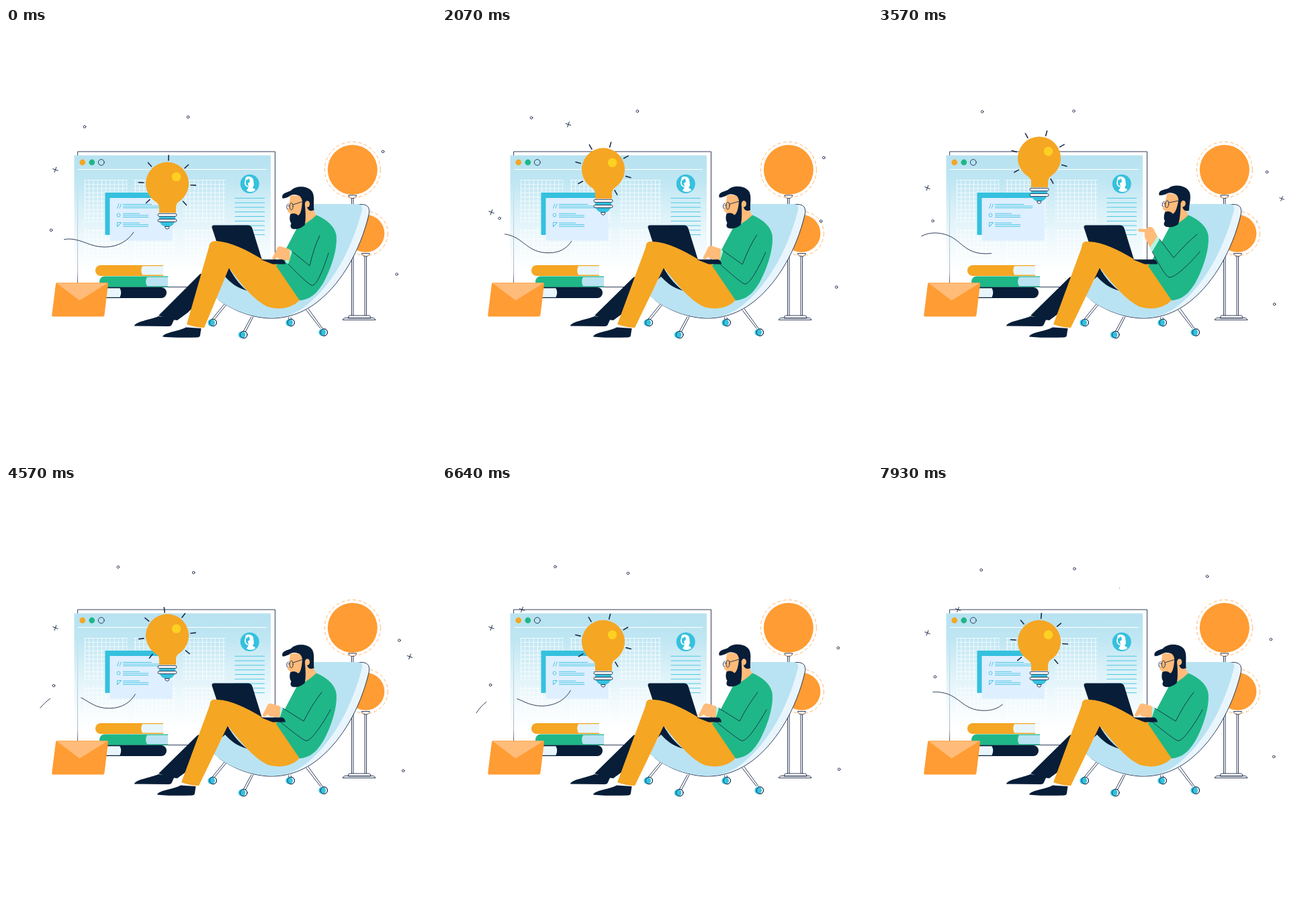
These frames come from a looping animation (640x640 px, 8 s). An HTML page:

```html
<!DOCTYPE html>
<html lang="en">
<head>
<meta charset="utf-8">
<title>Working idea</title>
<style>
  html, body { margin: 0; width: 100%; height: 100%; overflow: hidden; background: #fff; }
  svg { display: block; width: 100vw; height: 100vh; }
  .line { fill: none; stroke: #1b2a4a; stroke-width: .9; stroke-linecap: round; stroke-linejoin: round; }
  .outlined { fill: #fff; stroke: #1b2a4a; stroke-width: .9; }
  .navy { fill: #071d38; }
  .yellow { fill: #f5a623; }
  .orange { fill: #ff9c33; }
  .green { fill: #1fb787; }
  .cyan { fill: #35c1de; }
  .pale { fill: #b9e3f2; }
  .paper { fill: #e9f5fd; }
  .skin { fill: #ffbb79; }
  .code { fill: none; stroke: #4cc8e2; stroke-width: 1; }
  .dash { fill: none; stroke: #ffb469; stroke-width: 1; stroke-dasharray: 5 3.5; }
</style>
</head>
<body>
<svg viewBox="0 0 640 640">
  <defs>
    <linearGradient id="fade" x1="0" y1="0" x2="0" y2="1">
      <stop offset="0" stop-color="#b7e2f1"/>
      <stop offset=".2" stop-color="#bfe6f3"/>
      <stop offset=".9" stop-color="#fff" stop-opacity=".6"/>
      <stop offset="1" stop-color="#fff" stop-opacity="0"/>
    </linearGradient>
    <pattern id="cells" width="6.25" height="6.25" patternUnits="userSpaceOnUse" x="117" y="226">
      <path d="M0 .5H6.25M.5 0V6.25" stroke="#fff" stroke-opacity=".8" fill="none"/>
    </pattern>
    <g id="wheel">
      <circle class="outlined" cx="1.8" r="5.2"/>
      <circle class="cyan" cx="-.8" r="5.3"/>
      <circle class="line" cx="1.8" r="5.2"/>
    </g>
    <path id="dome" class="outlined" d="M-6 0H6Q5 4.5 0 4.5Q-5 4.5 -6 0Z"/>
  </defs>

  <!-- browser window -->
  <rect class="line" x="107" y="184" width="293.5" height="201.5"/>
  <rect x="101.5" y="189.5" width="292.5" height="193" fill="url(#fade)"/>
  <path d="M107 210.5H388" stroke="#fff"/>
  <circle class="yellow" cx="113.8" cy="200" r="4.4"/>
  <circle class="green" cx="127.8" cy="200" r="4.4"/>
  <circle class="line" cx="141.8" cy="200" r="4.4"/>
  <g id="grids" fill="url(#cells)"></g>
  <circle class="cyan" cx="362.8" cy="232" r="14"/>
  <path fill="#fff" d="M357 222Q364 219 368 225L369 234 367 238Q371 239 371 242Q363 246 358 242L361 237Q355 236 355 230Z"/>
  <path class="cyan" d="M357 227L362 224 363 229 360 231 361 236 357 233Z"/>
  <g id="sidebar"></g>
  <path class="cyan" d="M147.5 245H240V308H147.5Z"/>
  <path fill="#deefff" d="M154.5 253H248V316.5H154.5Z"/>
  <path class="code" d="M165.5 268.5l2.5-7m1 7l2.5-7M165.5 296v-6.5h6zl6-6.5"/>
  <circle class="code" cx="167.5" cy="278.5" r="2.4"/>
  <g id="snippets"></g>

  <path class="line" id="wave" pathLength="100" stroke-dasharray="70 30"/>

  <!-- bulb -->
  <g id="bulb">
    <g id="rays" stroke="#1b2a4a" stroke-width="1.6" stroke-linecap="round"></g>
    <path class="yellow" d="M228 275V266Q227 261 222 258A32 32 0 1 1 258 258Q253 261 253 266V275Z"/>
    <circle cx="253.5" cy="221.500" r="6.8" fill="#fdd022"/>
    <path class="cyan" d="M228 280h24v5h-24zM229 289H251Q248 296 240 296Q232 296 229 289Z"/>
    <rect class="outlined" x="226" y="276.300" width="28" height="4" rx="2"/>
    <rect class="outlined" x="226" y="284.500" width="28" height="4" rx="2"/>
    <path class="outlined" d="M236.500 295.500Q237 299.300 240 299.300Q243 299.300 243 295.500Z"/>
  </g>

  <!-- books and envelope -->
  <path class="yellow" d="M141 353H234V369H141A8 8 0 0 1 141 353Z"/>
  <path class="paper" d="M203 354.300H234V367.600H203Q199.500 361 203 354.300Z"/>
  <path class="green" d="M147 369.500H241V385.500H147A8 8 0 0 1 147 369.500Z"/>
  <path class="pale" d="M210 370.800H241V384.200H210Q206 377.500 210 370.800Z"/>
  <path class="navy" d="M149 386H231A8 8 0 0 1 231 402H149Z"/>
  <path class="paper" d="M149 387.300H169.500Q173 394 169.500 400.700H149Z"/>
  <path class="orange" d="M76 379H150Q152.500 379 152 381.500L146.500 427Q146 429.500 144 429.500H70Q68 429.500 68.300 427L74 381.500Q74.300 379 76 379Z"/>
  <path class="skin" d="M75 379.500H151.500L109.500 405.500Z"/>

  <!-- lamps -->
  <path class="line" d="M514.500 254V428M517 254V428M534 340V428M536.500 340V428"/>
  <use href="#dome" x="515.800" y="249"/>
  <use href="#dome" x="535.300" y="335.500"/>
  <path class="outlined" d="M509 432Q509 428 512 428H540Q543 428 543 432ZM501 434.500Q502 431.500 505 431.500H546Q549 431.500 550 434.500Z"/>
  <circle class="orange" cx="515.800" cy="211" r="37"/>
  <circle class="dash" cx="515.800" cy="211" r="41.500"/>
  <circle class="orange" cx="535.300" cy="305.800" r="28"/>
  <circle class="dash" cx="535.300" cy="305.800" r="33"/>

  <!-- chair -->
  <path class="line" d="M325 411L307 433M328 412L310 434M365 430L353 452M368 430L356 453M420.500 431L421 434M424 431L425 434M447 420L468 447M450 418L471 447"/>
  <use href="#wheel" x="306.500" y="438.500"/>
  <use href="#wheel" x="352" y="456.500"/>
  <use href="#wheel" x="422.500" y="438.500"/>
  <use href="#wheel" x="471.500" y="453"/>
  <path class="paper" stroke="#1b2a4a" stroke-width=".9" d="M458 262.500H529C539 262.500 542 268 540 278C527 332 500 377 468 404C442 426 415 433 390 432C360 430 332 417 316 404L360 380 420 370Z"/>
  <path class="pale" d="M456 262H524Q531 262 530 271C516 324 490 378 447 413Q424 431 397 431.500C360 431 328 416 308 398L330 362 420 380Z"/>

  <!-- legs and laptop -->
  <path class="navy" d="M191 443.500C192 437 216 434 227 429L251 432 247 441Q246 444 242 444Z"/>
  <path class="navy" id="backLeg"/>
  <path class="navy" d="M306.500 297Q306 293.500 309.500 293.500H360Q365 293.500 366.500 298L382 348 340 340 315 323Z"/>
  <path class="yellow" id="frontLeg"/>
  <path class="navy" id="shoe" d="M233 459.500C235 453 256 452 268 445.500L290.500 447 289 457Q289 460 285 460.500C265 461 245 461 233 459.500Z"/>

  <!-- upper body -->
  <path class="skin" d="M446 266L458 270Q459 277 464 281Q458 292 440 295Z"/>
  <path class="green" d="M434 296Q448 292 462 278.500C475 284 489 294 491.500 308C494 328 484 358 473 378C462 397 452 404 437 405.500L402 354Q409 345 416 330Z"/>
  <path class="green" id="arm"/>
  <path id="cuff" fill="#b3f4e3"/>
  <path class="line" id="creases"/>
  <g id="hand" class="skin">
    <path id="typing" d="M4 -9L-9 -13Q-14 -14 -15.500 -9L-22 4Q-22 7 -19 6.500L-14 3 -12 6 4 8Z"/>
    <path id="pointing" d="M6 -9L2 -16Q0 -23 -6 -23L-12 -19.500 -22 -20Q-24 -17 -21 -15.500L-13 -15Q-14 -8 -11 -3L-5 8Z"/>
  </g>
  <path class="navy" d="M379 344.500H411Q415 345 416 351.500H397Z"/>
  <g id="head">
    <path class="skin" d="M423 249C422 259 421 268 419 272Q419 274 422 275L425 281 441 283 450 270 447 250Z"/>
    <path class="navy" d="M411.500 253.500C409 246 418 245 424 242C431 234 450 234 456 244C460 252 457 262 458.500 271Q452 274 449 269L446 262 441.500 262Q441 252 436 249.500Q426 246 421 251Q414 254 411.500 253.500Z"/>
    <path class="navy" d="M441 258L444.500 257C445.500 270 447 285 444.500 293.500C438 299 431 300.500 425.500 298.500Q422 296 424.500 291Q421 286 423 277.500Q430 274 435 279Q440 276 441 258Z"/>
    <ellipse class="skin" cx="448.500" cy="262" rx="3.600" ry="4.800"/>
    <path class="line" d="M427 263L441 258.500M420.500 262Q417.500 262 417.800 267Q418 270 419.500 270M420 265L422 264.500"/>
    <ellipse class="line" cx="424.700" cy="265.500" rx="2.500" ry="5.300"/>
  </g>

  <g id="specks"></g>
</svg>
<script>
const LOOP = 8000;
const TAU = 2 * Math.PI;
const $ = id => document.getElementById(id);
const clamp = x => Math.max(0, Math.min(1, x));
const ease = (t, from, to) => { const x = clamp((t - from) / (to - from)); return x * x * (3 - 2 * x); };
const swing = (t, period, lead = 0) => (1 - Math.cos(TAU * (t + lead) / period)) / 2;
const mix = (a, b, k) => a + (b - a) * k;
const mixPoint = (p, q, k) => [mix(p[0], q[0], k), mix(p[1], q[1], k)];
const shift = ([x, y], dx, dy) => [x + dx, y + dy];

function add(parent, tag, attrs) {
  const el = document.createElementNS("http://www.w3.org/2000/svg", tag);
  for (const name in attrs) el.setAttribute(name, attrs[name]);
  return $(parent).appendChild(el);
}
const addRing = () => add("specks", "circle", { class: "line", r: 1.8 });
const addCross = () => add("specks", "path", { class: "line", d: "M-4 0H4M0 -4V4" });
const setPath = (id, d) => $(id).setAttribute("d", d);
const place = (el, x, y, extra = "") => el.setAttribute("transform", `translate(${x} ${y}) ${extra}`);

for (let i = 0; i < 6; i++)
  add("grids", "rect", { x: 117 + 73 * (i % 3), y: i < 3 ? 226 : 298, width: 63.4, height: i < 3 ? 63 : 50 });
for (let i = 0; i < 9; i++)
  add("sidebar", "path", { class: "code", d: `M340.5 ${253.3 + 6.8 * i}h44.5` });
for (let i = 0; i < 9; i++) {
  const width = (i % 3 ? 38 : 25) + (i < 3 ? 18 : 0);
  add("snippets", "path", { class: "code", d: `M174 ${262.5 + 13.8 * Math.floor(i / 3) + 2.6 * (i % 3)}h${width}` });
}
for (let a = -135; a <= 135; a += 45)
  add("rays", "path", { d: "M240 197V189.5", transform: `rotate(${a} 240 232)` });

// Rings that sway between two points; an axis bend curves the way there.
const drifters = [
  { a: [117, 147], b: [172, 119], period: 11.4, bendY: .6 },
  { a: [271, 132.5], b: [295, 122], period: 5.7 },
  { a: [66, 302], b: [87, 282], period: 6, lead: .45 },
  { a: [561, 184], b: [590, 242], period: 12.4, bendY: 1.35 },
  { a: [581.5, 366.5], b: [591.5, 428], period: 11, bendX: .5 }
].map(d => ({ ...d, el: addRing() }));

const slider = addCross();

const twinkles = [
  { x: 188, y: 143.5, from: .93, to: 3.2, el: addCross() },
  { x: 601, y: 254, from: 2.9, to: 5.9, el: addCross() },
  { x: 119, y: 184, from: 5.5, to: 8.7, el: addCross() },
  { x: 564, y: 287.5, from: 1.3, to: 3.7, el: addRing() },
  { x: 490, y: 134.5, from: 6.6, to: 9.2, el: addRing() },
  { x: 359.5, y: 152, from: 7.8, to: 10, el: addRing() }
];

const near = { wrist: [423, 342], elbow: [452, 354], shoulder: [467, 309] };
const far = { wrist: [409, 340], elbow: [443, 350], shoulder: [470, 307] };
const raised = { wrist: [413.5, 323.5], elbow: [440, 342], shoulder: [475, 307] };

function drawArm(t, raise) {
  const reach = ease(t, .4, 3.6);
  const joint = name => mixPoint(mixPoint(near[name], far[name], reach), raised[name], raise);
  const wrist = joint("wrist"), elbow = joint("elbow"), shoulder = joint("shoulder");
  const elbowLow = shift(elbow, 3 - 10 * raise, 29);
  const shoulderLow = shift(shoulder, 13 - 9 * raise, 26);
  const half = 3 + 2.5 * raise;
  const top = shift(wrist, half, -9.3), bottom = shift(wrist, -half, 9.3);

  const length = Math.hypot(top[0] - elbow[0], top[1] - elbow[1]);
  const out = [0, 1].map(i => (top[i] - elbow[i]) / length * 6);
  const [cx, cy] = elbowLow;
  setPath("arm", `M${top}L${elbow} ${shoulder} ${shoulderLow}Q${cx + 8} ${cy + 3} ${elbowLow}L${bottom}Z`);
  setPath("cuff", `M${top}L${bottom} ${shift(bottom, ...out)} ${shift(top, ...out)}Z`);
  setPath("creases",
    `M${shoulder}Q${shift(mixPoint(shoulder, elbow, .4), -3, 0)} ${elbow}L${top}` +
    `M${shoulderLow}C${shift(mixPoint(shoulderLow, elbowLow, .45), 3, 4)} ${cx + 7} ${cy + 2} ${elbowLow}Q${cx - 6} ${cy - 2} ${bottom}`);
  place($("hand"), ...shift(wrist, ...out));
  $("typing").style.display = raise < .5 ? "" : "none";
  $("pointing").style.display = raise < .5 ? "none" : "";
}

function drawLegs(step) {
  const ankle = 269 - 8 * step, knee = 302 + step, inner = 332 - 2 * step;
  setPath("frontLeg", `M${ankle} 441L${knee} ${326 + step}C${knee + 1} 319 306 317 ${314 + step} ${317 + step}` +
    `C335 319 358 330 381 344L402 351 437 405C425 418 405 420 390 415C370 406 352 384 ${inner} 357L${ankle + 26} 446Q${ankle + 13} 446 ${ankle} 441Z`);
  setPath("backLeg", `M227 428L${289 - 4 * step} ${366 + 5 * step} ${inner} 357` +
    `C${inner + 8} 372 349 384 359 391C344 387 334 379 326 370L270 424 255 435 246 434Z`);
  place($("shoe"), -8 * step, 0);
}

// A curve whose crest and trough slide, seen through a circling gap.
function drawWave(t) {
  const w = swing(t, 5.95);
  const crest = [95 - 10 * w, 314 - 10 * w], trough = [147 + 15 * w, 326 + 11 * w];
  const tail = [191 + 3 * w, 302 + 18 * w];
  setPath("wave", `M51 ${341 - 24 * w}C62 ${323 - 14 * w} ${76 - 6 * w} ${crest[1]} ${crest}` +
    `C${shift(crest, 20 + 20 * w, 1 + w)} ${shift(trough, -22 - 18 * w, 0)} ${trough}` +
    `C${shift(trough, 21 - 5 * w, 0)} ${shift(tail, -7, 13 - 2 * w)} ${tail}`);
  const turn = .27 + .49 * t;
  const start = turn + .085 * Math.cos(TAU * (turn - .05));
  $("wave").setAttribute("stroke-dashoffset", 100 - 100 * (start % 1));
}

function draw(t) {
  const lift = ease(t, .9, 3.13) - ease(t, 3.4, 5.1);
  place($("bulb"), 0, -39 * lift);
  $("rays").setAttribute("transform", `rotate(${16 * Math.sin(2.95 + TAU * t / .75)} 240 232)`);

  drawWave(t);
  drawLegs(ease(t, 0, 2.07));

  const raise = ease(t, 2.4, 3.1) - ease(t, 3.7, 4.4);
  drawArm(t, raise);
  const nod = mix(1.8 * swing(t, 4.3), 6.5, raise);
  $("head").setAttribute("transform", `translate(${2.5 * raise} 0) rotate(${nod} 455 290)`);

  for (const { a, b, period, lead, bendX = 1, bendY = 1, el } of drifters) {
    const u = swing(t, period, lead);
    place(el, mix(a[0], b[0], u ** bendX), mix(a[1], b[1], u ** bendY));
  }
  const cycle = t % 7.3;
  place(slider, 73.5, 211 + 64 * (ease(cycle, .2, 2.2) - ease(cycle, 2.3, 4.6)), "rotate(20)");
  for (const { x, y, from, to, el } of twinkles) {
    const size = Math.min(1, 1.4 * Math.sin(Math.PI * clamp((t - from) / (to - from))));
    el.style.display = size > .02 ? "" : "none";
    place(el, x, y, `rotate(${20 + 25 * (1 - size)}) scale(${size})`);
  }
}

const began = performance.now();
function frame() {
  draw((performance.now() - began) % LOOP / 1000);
  requestAnimationFrame(frame);
}
frame();
</script>
</body>
</html>
```
